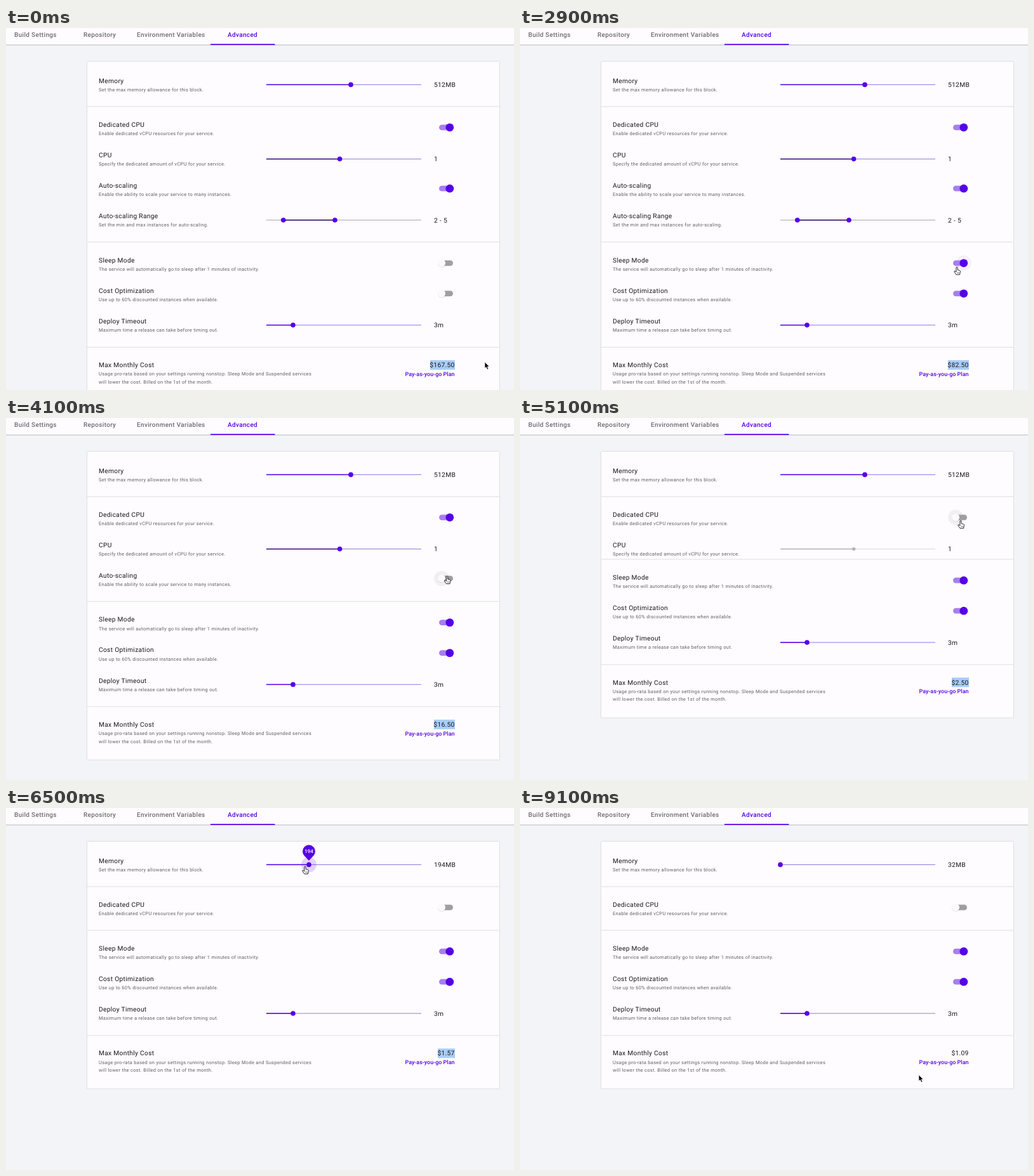
Recreate the animation shown at these times as an HTML page. Size 800x571 px, loop 9500 ms.

```html
<!DOCTYPE html>
<html lang="en">
<head>
<meta charset="utf-8">
<title>Service settings</title>
<style>
  html, body { margin: 0; width: 100%; height: 100%; overflow: hidden; background: #f2f4f7; }
  svg { display: block; width: 800px; height: 571px; font-family: Roboto, sans-serif; cursor: default; }
  text { white-space: pre; text-rendering: geometricPrecision; }
  .title { font-size: 10.24px; letter-spacing: .31px; fill: #18171b; }
  .sub { font-size: 7.5px; letter-spacing: .3px; fill: #605f64; }
  .tab { font-size: 10px; font-weight: 500; letter-spacing: .33px; fill: #6c6b70; }
  .link { font-size: 8.9px; font-weight: 500; letter-spacing: .05px; fill: #5600e8; }
  .pin { font-size: 8px; font-weight: 500; fill: #fff; text-anchor: middle; }
  .end { text-anchor: end; }
</style>
</head>
<body>
<svg id="stage" viewBox="0 0 800 571"></svg>
<script>
const LOOP = 9500, STEP = 100;
const PURPLE = '#5600e8', PAPER = '#fefcff', PAGE = '#f2f4f7', EDGE = '#dedee3';
const stage = document.getElementById('stage');

// Times at which each switch is clicked and hovered
const COST = { click: 1200, from: 1000, to: 2000 };
const SLEEP = { click: 2500, from: 2300, to: 3100 };
const SCALE = { click: 3600, from: 3500, to: 4400 };
const DEDICATED = { click: 4800, from: 4700, to: 5400 };

// Keys are [time, value, value...]
const POINTER = [
  [300, 754, 527], [1000, 692, 414], [1900, 692, 414], [2300, 688, 377], [3100, 688, 377],
  [3600, 694.5, 249.5], [4300, 694.5, 249.5], [4700, 694, 162], [5300, 694, 162], [5800, 543, 92],
  [6000, 543, 92], [6500, 471, 92], [6900, 408, 92], [7300, 408, 92], [7700, 642, 432],
  [7800, 664, 482], [8200, 664, 482], [8500, 710, 369], [8800, 628, 425], [8900, 628, 425], [9000, 628, 421]
];
const MEMORY = [[6000, 543, 512], [6500, 477, 194], [6900, 410, 32]];

const ramp = (t, start, length) => {
  const p = Math.min(1, Math.max(0, (t - start) / length));
  return p * p * (3 - 2 * p);
};
const within = (t, from, to) => t >= from && t < to;

function follow(keys, t) {
  const next = keys.findIndex(key => key[0] > t);
  if (next === 0) return keys[0].slice(1);
  if (next < 0) return keys[keys.length - 1].slice(1);
  const a = keys[next - 1], b = keys[next], p = (t - a[0]) / (b[0] - a[0]);
  return a.slice(1).map((v, i) => v + (b[i + 1] - v) * p);
}

const text = (x, y, style, s) => `<text x="${x}" y="${y}" class="${style}">${s}</text>`;
const rect = (x, y, w, h, fill, more = '') =>
  `<rect x="${x}" y="${y}" width="${w}" height="${h}" fill="${fill}" ${more}/>`;
const circle = (x, y, r, fill, more = '') => `<circle cx="${x}" cy="${y}" r="${r}" fill="${fill}" ${more}/>`;
const rule = y => rect(128, y, 650, 1, EDGE);

// y is the middle of the title line
const row = (y, title, ...lines) => text(146, y + 3.7, 'title', title) +
  lines.map((line, i) => text(146, y + 16.8 + i * 12.6, 'sub', line)).join('');

function slider(y, from, to, value, rest, fill = PURPLE, disabled = false) {
  const dots = from > 410 ? [from, to] : [to];
  y += 6.4;
  if (disabled) [rest, fill] = ['#dcdbe0', '#b3b2b7'];
  return rect(410, y - .6, 244, 1.2, rest) + rect(from, y - .75, to - from, 1.5, fill) +
    dots.map(x => circle(x, y, disabled ? 2.7 : 3.8, disabled ? fill : PURPLE)).join('') +
    text(674, y + 3.6, 'title', value);
}

function toggle(y, t, spec, startsOn) {
  const moved = ramp(t, spec.click - 50, 200);
  const k = startsOn ? 1 - moved : moved, on = k > .5, x = 686 + 12.8 * k;
  y += 4.8;
  const halo = within(t, spec.from, spec.to)
    ? circle(x, y, 12, on ? PURPLE : '#000', 'opacity=".05"') : '';
  return halo + rect(682, y - 4.4, 22, 8.8, on ? '#a67ff0' : '#9f9ea1', 'rx="4.4"') +
    (on ? '' : circle(x, y + .6, 6.3, '#000', 'opacity=".1"')) +
    circle(x, y, on ? 6.4 : 6.1, on ? PURPLE : '#faf9fb');
}

function memoryPin(t, x, memory) {
  const size = ramp(t, 5850, 200) * (1 - ramp(t, 7420, 370));
  const halo = within(t, 5900, 7400) ? circle(x, 89.4, 12, PURPLE, 'opacity=".16"') : '';
  return halo + (size < .01 ? '' : `<g transform="translate(${x} 83) scale(${size})">
    <path d="M0 0L-7.3-7.8A10 10 0 1 1 7.3-7.8Z" fill="${PURPLE}"/>${text(0, -12, 'pin', memory)}</g>`);
}

function pointer(t) {
  const [x, y] = follow(POINTER, t);
  const hand = [COST, SLEEP, SCALE, DEDICATED].some(s => within(t, s.from, s.to)) || within(t, 5700, 7400);
  const shape = hand
    ? '<path d="M-1.1 1A1.1 1.1 0 0 1 1.1 1V4.6L4.3 5.3Q5.7 5.8 5.4 7.4L4.5 12H-1L-4.2 7.5Q-4.5 6-3 6.3L-1.1 7.8Z" fill="#fff" stroke="#111" stroke-width=".9"/><path d="M1 8v2.4M3 8v2.4" stroke="#111" stroke-width=".6"/>'
    : '<path d="M0 0V9.6L2.2 7.7 3.9 11.5 5.6 10.8 4 7.1H7Z" fill="#000" stroke="#fff" stroke-width=".6"/>';
  return `<g transform="translate(${x} ${y})">${shape}</g>`;
}

function monthlyCost(t, memory) {
  if (t < 1300) return 167.5;
  if (t < 3700) return 82.5;
  if (t < 4900) return 16.5;
  return 2.5 - (512 - memory) * .0029375;
}

function draw(t) {
  const [x, exact] = follow(MEMORY, t), memory = Math.round(exact);
  const lift = 48.2 * ramp(t, 3650, 350) + 96.4 * ramp(t, 4880, 350);
  const price = '$' + monthlyCost(t, memory).toFixed(2);
  const priceWidth = price.length * 6.05 - 3.2;

  const header = rect(0, 0, 800, 27, PAPER) + rect(0, 26.3, 800, 1, '#b9b8bd') +
    text(13, 14.3, 'tab', 'Build Settings') + text(122, 14.3, 'tab', 'Repository') +
    text(206, 14.3, 'tab', 'Environment Variables') +
    `<text x="349" y="14.3" class="tab" style="fill:${PURPLE}">Advanced</text>` +
    rect(322, 25, 101.5, 1.7, PURPLE);

  const upper = rect(127.5, 52.5, 650, 600, PAPER, `rx="2" stroke="${EDGE}"`) +
    row(83, 'Memory', 'Set the max memory allowance for this block.') +
    slider(83, 410, x, memory + 'MB', '#a18ae6') + memoryPin(t, x, memory) + rule(123.5) +
    row(152, 'Dedicated CPU', 'Enable dedicated vCPU resources for your service.') +
    toggle(152, t, DEDICATED, true) +
    row(200.2, 'CPU', 'Specify the dedicated amount of vCPU for your service.') +
    slider(200.2, 410, 525.6, '1', '#a18ae0', '#3a0a80', t >= 4800) +
    row(248.4, 'Auto-scaling', 'Enable the ability to scale your service to many instances.') +
    toggle(248.4, t, SCALE, true) +
    row(296.6, 'Auto-scaling Range', 'Set the min and max instances for auto-scaling.') +
    slider(296.6, 436.8, 518, '2 - 5', '#bab0b0', '#3a0a70', t >= 3600);

  // The lower sections slide up over the collapsing rows
  const lower = `<g transform="translate(0 ${-lift})">` +
    rect(120, 580, 670, 250, PAGE) +
    rect(127.5, 337.5, 650, 250, PAPER, `rx="1" stroke="${EDGE}"`) +
    row(366, 'Sleep Mode', 'The service will automatically go to sleep after 1 minutes of inactivity.') +
    toggle(366, t, SLEEP, false) +
    row(414, 'Cost Optimization', 'Use up to 60% discounted instances when available.') +
    toggle(414, t, COST, false) +
    row(462.2, 'Deploy Timeout', 'Maximum time a release can take before timing out.') +
    slider(462.2, 410, 452, '3m', '#a98bf0') + rule(503) +
    row(531.4, 'Max Monthly Cost',
      'Usage pro-rata based on your settings running nonstop. Sleep Mode and Suspended services',
      'will lower the cost. Billed on the 1st of the month.') +
    (t < 8000 ? rect(707 - priceWidth, 524, priceWidth, 15, '#a9cdf7') : '') +
    text(706.7, 535.1, 'title end', price) +
    text(706.5, 549, 'link end', 'Pay-as-you-go Plan') + '</g>';

  stage.innerHTML = header + upper + lower + pointer(t);
}

let shown = -1;
function tick() {
  const t = Math.floor(performance.now() % LOOP / STEP) * STEP;
  if (t !== shown) draw(shown = t);
  requestAnimationFrame(tick);
}
tick();
</script>
</body>
</html>
```
